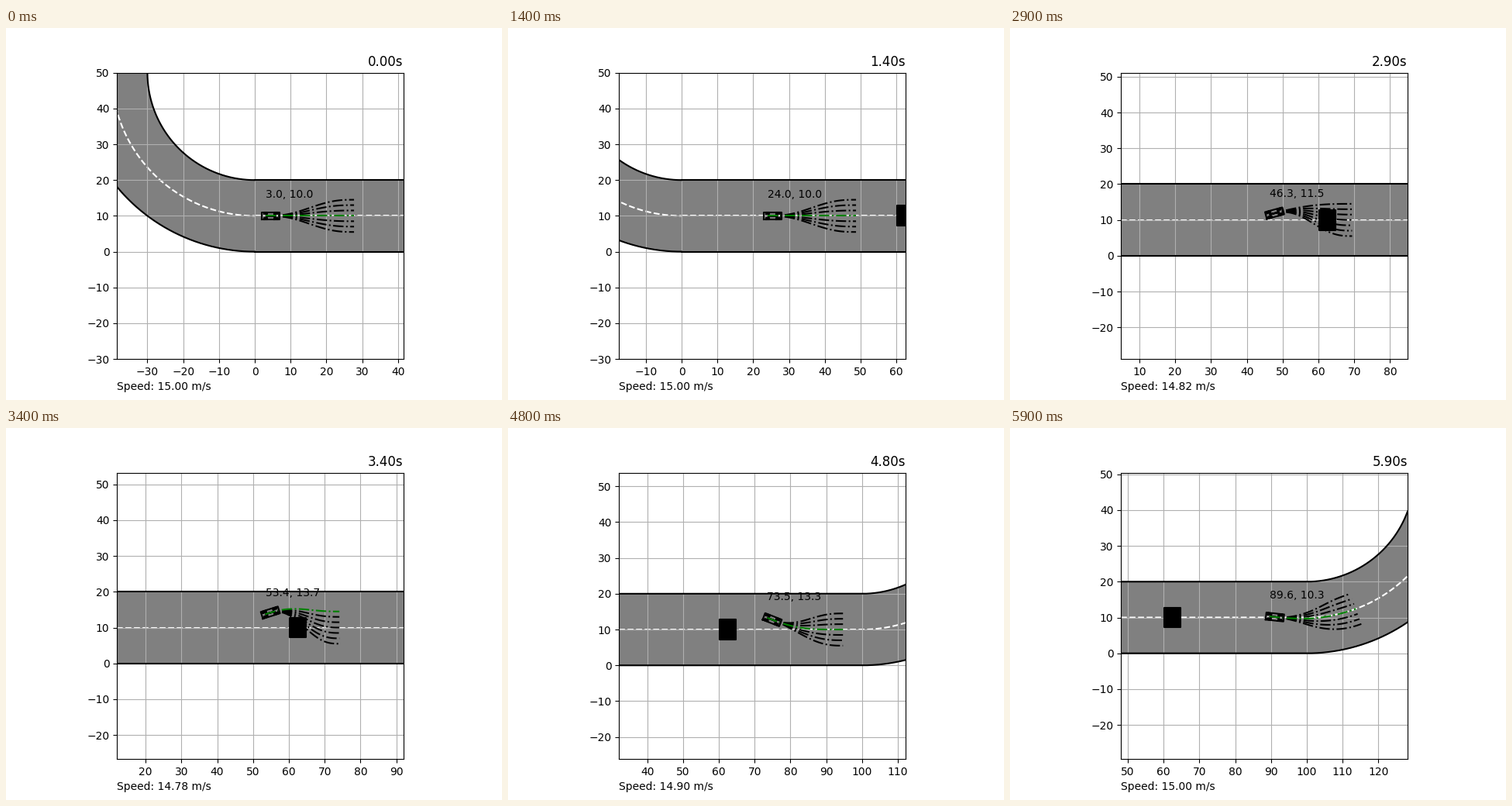
Recreate the animation shown at these times as a matplotlib script. Size 640 by 480 pixels, loop 6000 ms.

```python
import numpy as np
import matplotlib.pyplot as plt
from matplotlib.animation import FuncAnimation

FRAMES, DT = 60, 0.1
VIEW = 40
ROAD_END, BEND_Y = 100, 50
RADII = {"upper": 30, "centre": 40, "lower": 50}
OFFSETS = np.arange(4.5, -5, -1.5)
WHEEL_BASE, TREAD = 3.0, 0.7

# time, x, y, dx/dt, dy/dt of the manoeuvre around the obstacle
KNOTS = np.array([
    (1.9, 31.5, 10.0, 15.0, 0.0),
    (2.9, 46.3, 11.5, 14.5, 3.9),
    (4.0, 62.0, 15.5, 14.7, 0.6),
    (4.8, 73.5, 13.3, 13.85, -5.5),
    (5.9, 89.6, 10.3, 14.9, -1.6),
])


def position(t):
    """Rear axle position: straight cruise, then cubic Hermite pieces."""
    if t <= KNOTS[0, 0]:
        return np.array([3 + 15 * t, 10.0])
    i = min(np.searchsorted(KNOTS[:, 0], t) - 1, len(KNOTS) - 2)
    a, b = KNOTS[i], KNOTS[i + 1]
    h = b[0] - a[0]
    u = (t - a[0]) / h
    blend = u * u * (3 - 2 * u)
    return (a[1:3] * (1 - blend) + b[1:3] * blend
            + h * u * (1 - u) ** 2 * a[3:5] + h * u * u * (u - 1) * b[3:5])


def heading(t):
    dx, dy = position(t + 0.01) - position(t - 0.01)
    return np.arctan2(dy, dx)


def speed(t):
    return np.interp(t, [2.0, 2.1, 2.9, 4.0, 4.8, 5.7],
                     [15, 14.98, 14.82, 14.73, 14.90, 15])


def chosen_offset(t):
    if 2.75 < t < 3.35:
        return None
    return 4.5 if 1.95 < t < 3.75 else 0.0


def to_road(s, d):
    """Map distance along and beside the centre line to x, y."""
    r = RADII["centre"]
    angle = np.maximum(s - ROAD_END, 0) / r
    x = np.minimum(s, ROAD_END) + (r - d) * np.sin(angle)
    return x, BEND_Y - (r - d) * np.cos(angle)


def candidate(pos, theta, target):
    """Quintic lateral move from the current pose to a lane offset."""
    d0 = pos[1] - 10
    length = 24.7 - 1.07 * abs(d0)
    u = np.linspace(0, 1, 60)
    slope = np.tan(theta) * length
    rise = target - d0
    d = (d0 + slope * u
         + (10 * rise - 6 * slope) * u ** 3
         + (8 * slope - 15 * rise) * u ** 4
         + (6 * rise - 3 * slope) * u ** 5)
    return to_road(pos[0] + length * u, d)


def box(x0, x1, y0, y1):
    return np.array([(x0, y0), (x1, y0), (x1, y1), (x0, y1), (x0, y0)])


def turn(points, angle):
    c, s = np.cos(angle), np.sin(angle)
    return points @ np.array([(c, s), (-s, c)])


def car_outline(pos, theta, steer):
    gap = np.full((1, 2), np.nan)
    parts = [box(-1, 4, -1, 1)]
    wheel = box(-0.5, 0.5, -0.2, 0.2)
    for x, angle in ((0, 0), (WHEEL_BASE, steer)):
        for y in (-TREAD, TREAD):
            parts += [gap, turn(wheel, angle) + (x, y)]
    return turn(np.vstack(parts), theta) + pos


def entry_bend(r):
    a = np.linspace(np.pi, 1.5 * np.pi, 400)
    return r * np.cos(a), BEND_Y + r * np.sin(a)


def main_road(r):
    a = np.linspace(0, np.pi / 2, 401)[1:]
    x = np.append(np.linspace(0, ROAD_END, 1001), ROAD_END + r * np.sin(a))
    y = np.append(np.full(1001, float(BEND_Y - r)), BEND_Y - r * np.cos(a))
    return x, y


fig, ax = plt.subplots(figsize=(6.4, 4.8), dpi=100)
ax.set_aspect("equal")
ax.grid(True)

for part in (entry_bend, main_road):
    ux, uy = part(RADII["upper"])
    lx, ly = part(RADII["lower"])
    ax.fill(np.append(ux, lx[::-1]), np.append(uy, ly[::-1]),
            color="gray", linewidth=0.5)
    ax.plot(ux, uy, "k")
    ax.plot(lx, ly, "k")
    ax.plot(*part(RADII["centre"]), "w--", zorder=1.2)

ax.fill(*box(60.2, 64.8, 7.2, 12.8).T, color="black", linewidth=1.5,
        joinstyle="round", zorder=3)

paths = [ax.plot([], [], "k-.")[0] for _ in OFFSETS]
best, = ax.plot([], [], "g-.")
car, = ax.plot([], [], "k")
label = ax.text(0, 0, "")
clock = ax.set_title("", loc="right")


def update(frame):
    t = frame * DT
    pos, theta = position(t), heading(t)
    cx, cy = position(t - DT)
    ax.set_xlim(cx - VIEW, cx + VIEW)
    ax.set_ylim(cy - VIEW, cy + VIEW)

    target = chosen_offset(t)
    for line, offset in zip(paths, OFFSETS):
        line.set_data(*candidate(pos, theta, offset))
        line.set_visible(offset != target)
    best.set_visible(target is not None)
    if target is not None:
        best.set_data(*candidate(pos, theta, target))

    curvature = (heading(t + 0.05) - heading(t - 0.05)) / 1.5
    steer = np.arctan(WHEEL_BASE * curvature)
    car.set_data(*car_outline(pos, theta, steer).T)

    label.set_position((pos[0], pos[1] + 5))
    label.set_text(f"{pos[0]:.1f}, {pos[1]:.1f}")
    clock.set_text(f"{t:.2f}s")
    ax.set_xlabel(f"Speed: {speed(t):.2f} m/s", loc="left")
    return [*paths, best, car, label, clock]


anim = FuncAnimation(fig, update, frames=FRAMES, interval=100,
                     repeat=True, repeat_delay=0, blit=False)
plt.show()
```
